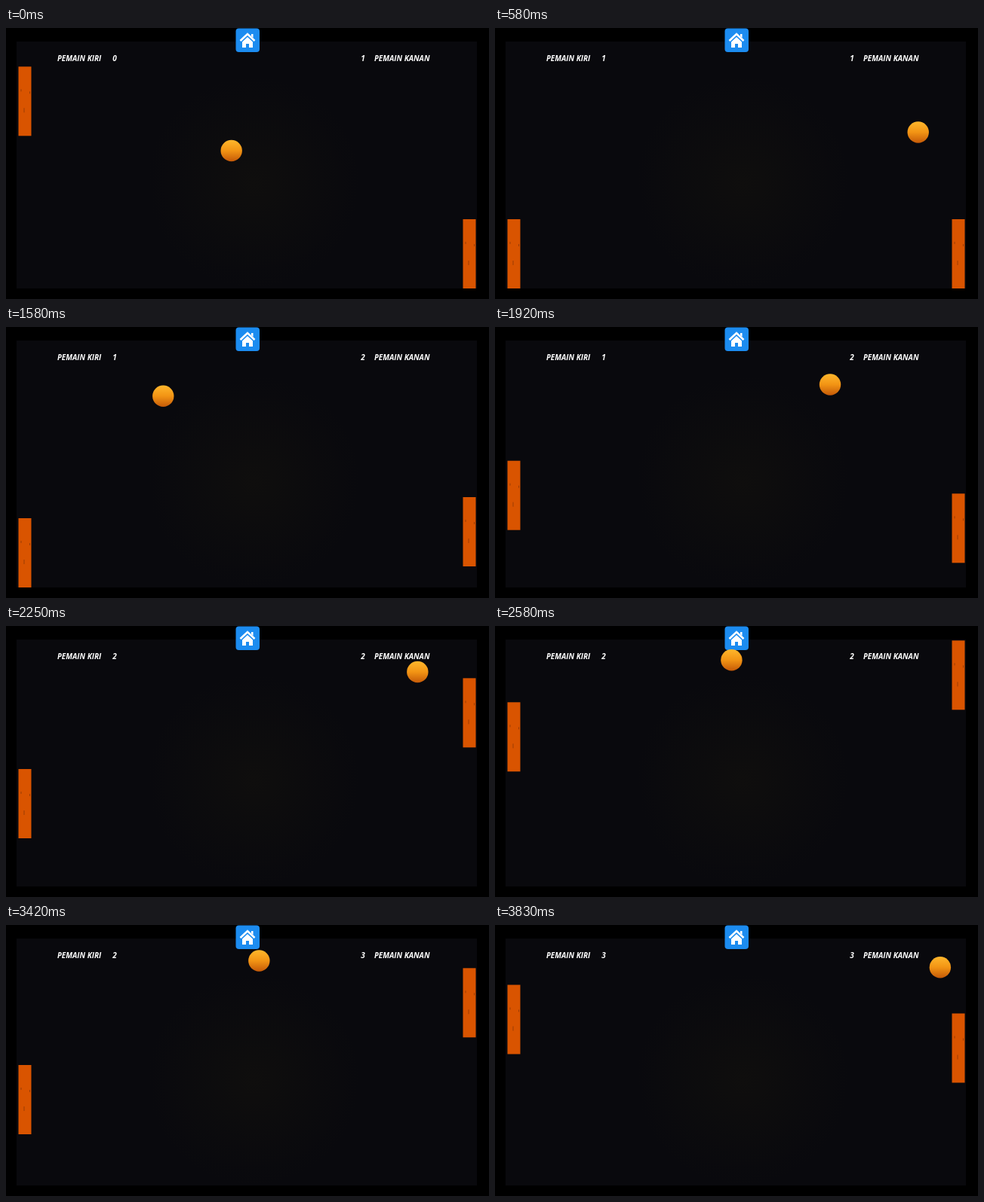
These frames come from a looping animation (640x360 px, 3910 ms). An HTML page:

```html
<!DOCTYPE html>
<html lang="id">
<head>
<meta charset="utf-8">
<title>Pong</title>
<style>
  html, body { margin: 0; width: 100%; height: 100%; overflow: hidden; background: #000; }
  svg { display: block; width: 640px; height: 360px; }
  text { font: italic bold 10px "Open Sans", sans-serif; fill: #fff; }
  .score { text-anchor: middle; }
</style>
</head>
<body>
<svg viewBox="0 0 640 360">
  <defs>
    <radialGradient id="glow">
      <stop offset="0" stop-color="#0f0e0d"/>
      <stop offset="1" stop-color="#09090d"/>
    </radialGradient>
    <linearGradient id="amber" x2="0" y2="1">
      <stop offset="0" stop-color="#ffb72c"/>
      <stop offset=".5" stop-color="#f29414"/>
      <stop offset="1" stop-color="#c55a08"/>
    </linearGradient>
    <g id="paddle">
      <rect width="17" height="92" fill="#d95400"/>
      <path d="M3.500 30v3M15 33v3M7.500 55v6" stroke="#9c3c04"/>
    </g>
  </defs>
  <rect x="14" y="18" width="610" height="328" fill="#09090d"/>
  <circle cx="328" cy="205" r="140" fill="url(#glow)"/>

  <rect x="304.500" y=".5" width="31.500" height="31.500" rx="4" fill="#1c8cf0"/>
  <path d="M310.500 17 320 8l9.500 9" fill="none" stroke="#fff" stroke-width="2.600"/>
  <path d="M313 18.500 320 12l7 6.500V26h-5v-5h-4v5h-5zM325 8h2.500v5L325 10.700z" fill="#fff"/>

  <text x="68" y="43.500">PEMAIN KIRI</text>
  <text x="488" y="43.500">PEMAIN KANAN</text>
  <text id="leftScore" class="score" x="144" y="43.500"></text>
  <text id="rightScore" class="score" x="473" y="43.500"></text>

  <use id="leftPaddle" href="#paddle"/>
  <use id="rightPaddle" href="#paddle"/>
  <circle id="ball" r="14.2" fill="url(#amber)"/>
</svg>
<script>
  const LOOP = 3910, TICK = 1000 / 12;
  const PADDLE_SPEED = 38;
  const $ = id => document.getElementById(id);

  // Where the ball turns; it flies straight in between.
  const bounces = [
    { at: 0, x: 298.7, y: 163 },
    { at: 5.85, x: 630, y: 143 },
    { at: 15.89, x: 25, y: 103.6 },
    { at: 25.85, x: 612, y: 65.6 },
    { at: 34.25, x: 125, y: 32.5 },
    { at: 35.89, x: 30, y: 38.7 },
    { at: 45.63, x: 612, y: 55.5 },
    { at: 47, x: 530, y: 58 }
  ];
  // Moves as [start tick, height to reach].
  const leftMoves = [[0.5, 254], [20, 177.7], [25, 190], [28, 101.3], [35.1, 186], [42.5, 79.5]];
  const rightMoves = [[10, 112], [16, 254], [22.14, 19.3], [40, 117.5]];

  function ballAt(tick) {
    const next = bounces.findIndex(bounce => bounce.at > tick);
    const a = bounces[next - 1], b = bounces[next];
    const k = (tick - a.at) / (b.at - a.at);
    return [a.x + (b.x - a.x) * k, a.y + (b.y - a.y) * k];
  }

  function paddleAt(tick, y, moves) {
    for (const [start, goal] of moves) {
      const reach = PADDLE_SPEED * Math.max(0, tick - start);
      y += Math.max(-reach, Math.min(reach, goal - y));
    }
    return y;
  }

  const place = (id, x, y) => $(id).setAttribute("transform", `translate(${x} ${y})`);

  function draw() {
    // The game advances at 12 ticks per second.
    const tick = Math.floor((performance.now() % LOOP + 3.4) / TICK);
    const past = bounces.filter(bounce => bounce.at <= tick);
    place("ball", ...ballAt(tick));
    place("leftPaddle", 16.5, paddleAt(tick, 51.3, leftMoves));
    place("rightPaddle", 605.5, paddleAt(tick, 254, rightMoves));
    $("leftScore").textContent = past.filter(bounce => bounce.x > 600).length;
    $("rightScore").textContent = 1 + past.filter(bounce => bounce.x < 40).length;
    requestAnimationFrame(draw);
  }
  draw();
</script>
</body>
</html>
```
